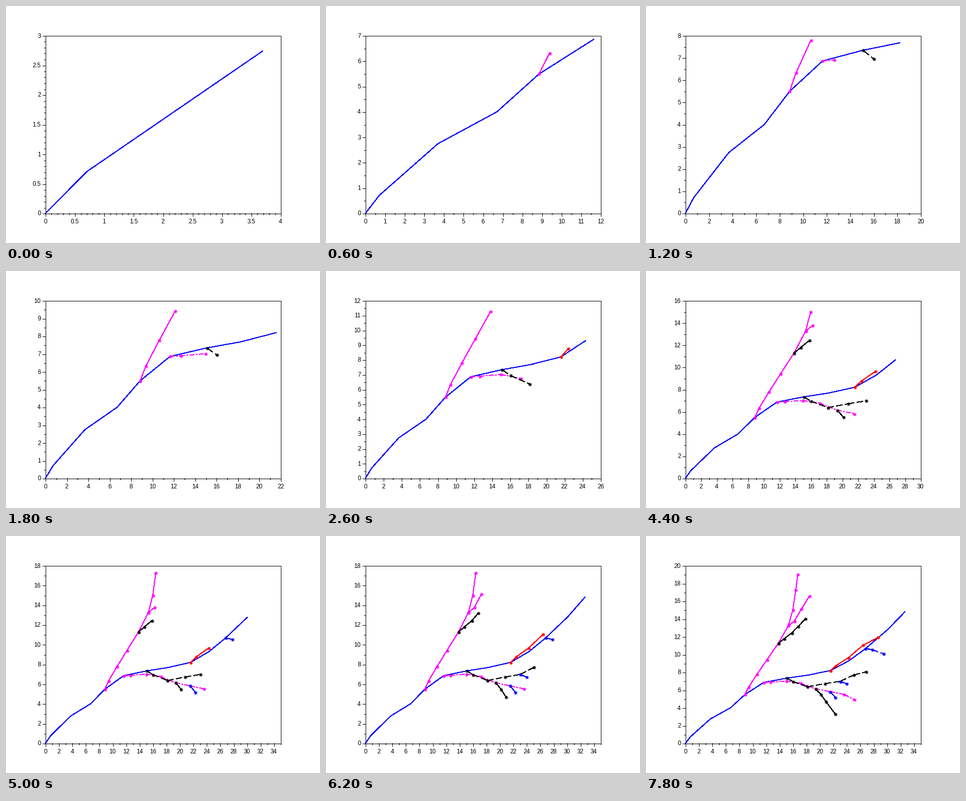
Animation of 610x460 px, one loop 8 s. Source, as a matplotlib script:

```python
import math

import matplotlib.pyplot as plt
import numpy as np
from matplotlib.animation import FuncAnimation

W, H, DPI = 610, 460, 80
STEPS, STEP_MS = 40, 200
LEFT, RIGHT, TOP, BOTTOM = 76, 533, 57, 402
PX = 72 / DPI  # one pixel in points

BLUE, MAGENTA, BLACK, RED = "#0000ff", "#ff00ff", "#000000", "#ff0000"
SOLID, DASH, DASHDOT = (), (11, 5), (8, 3, 2, 3)


class Branch:
    """A polyline that may sprout from vertex `at` of its parent."""

    def __init__(self, color, style, points, parent=None, at=0):
        self.color, self.style = color, style
        self.parent, self.at = parent, at
        base = [parent.points[at]] if parent else []
        self.points = base + points


trunk = Branch(BLUE, SOLID, [
    (0, 0), (0.707, 0.707), (3.695, 2.74), (6.71, 4.0), (8.86, 5.49),
    (11.66, 6.86), (15.1, 7.34), (18.25, 7.68), (21.6, 8.2),
    (24.35, 9.3), (26.82, 10.68), (30.06, 12.78), (32.7, 14.83)])
rise = Branch(MAGENTA, SOLID, [
    (9.4, 6.32), (10.66, 7.78), (12.14, 9.41), (13.84, 11.27),
    (15.33, 13.25), (15.98, 15.0), (16.42, 17.25), (16.73, 19.0)], trunk, 4)
fall = Branch(MAGENTA, DASHDOT, [
    (12.65, 6.9), (14.98, 7.01), (17.16, 6.76), (19.37, 6.14),
    (21.55, 5.82), (23.62, 5.52), (25.15, 4.9)], trunk, 5)
wave = Branch(BLACK, DASH, [
    (16.02, 6.95), (18.17, 6.37), (20.77, 6.72), (23.03, 6.98),
    (25.08, 7.7), (26.9, 8.04)], trunk, 6)
upper = Branch(RED, SOLID, [
    (22.44, 8.76), (24.24, 9.63), (26.45, 11.05), (28.67, 11.92)], trunk, 8)
ridge = Branch(BLACK, SOLID, [
    (14.7, 11.78), (15.84, 12.43), (16.8, 13.18), (17.86, 14.02)], rise, 4)
fork = Branch(MAGENTA, SOLID, [
    (16.22, 13.76), (17.26, 15.12), (18.47, 16.58)], rise, 5)
drop = Branch(BLACK, SOLID, [
    (20.17, 5.5), (20.93, 4.68), (22.31, 3.3)], fall, 4)
tail = Branch(BLUE, DASH, [(27.83, 10.53), (29.5, 10.07)], trunk, 10)
stub_low = Branch(BLUE, SOLID, [(22.32, 5.16)], fall, 5)
stub_mid = Branch(BLUE, DASH, [(23.99, 6.71)], wave, 4)
BRANCHES = [trunk, rise, fall, wave, upper, ridge, fork, drop,
            tail, stub_low, stub_mid]


def grow():
    """Visible vertex count per branch for every step, one tip at a time."""
    shown = {trunk: 3}
    states = [dict(shown)]
    while len(states) < STEPS:
        for tip in list(shown):
            if shown[tip] == len(tip.points):
                continue
            start = shown[tip] - 1
            shown[tip] += 1
            for child in BRANCHES:
                if child.parent is tip and child.at == start:
                    shown[child] = 2
            states.append(dict(shown))
    return states[:STEPS]


STATES = grow()


def scale(top):
    """Axis limit, label step and minor step that hold the value `top`."""
    for step in (0.5, 1, 2, 5):
        count = math.ceil(top / step - 1e-9)
        if count <= 13:
            break
    major = min(step, 2)
    return count * step, major, major / (5 if step < 1 else 2)


def ticks(limit, step):
    return np.arange(0, limit + step / 100, step)


fig = plt.figure(figsize=(W / DPI, H / DPI), dpi=DPI, facecolor="white")
ax = fig.add_axes([0, 0, 1, 1])


def stroke(x, y, color=BLACK, dashes=SOLID):
    line, = ax.plot(x, y, color=color, lw=PX, antialiased=False,
                    solid_capstyle="butt", dash_capstyle="butt")
    if dashes:
        line.set_dashes(dashes)


def label(x, y, value, align):
    ax.text(x, y, f"{value:g}", ha=align, va="center_baseline",
            family="Liberation Sans", size=11.7 * PX, color=BLACK)


def draw_axes(xlim, ylim, to_x, to_y):
    stroke([LEFT + .5, RIGHT + .5, RIGHT + .5, LEFT + .5, LEFT + .5],
           [TOP + .5, TOP + .5, BOTTOM + .5, BOTTOM + .5, TOP + .5])
    for index, size in ((1, 6), (2, 3)):
        for v in ticks(xlim[0], xlim[index]):
            x = math.floor(to_x(v)) + .5
            stroke([x, x], [BOTTOM, BOTTOM + size])
        for v in ticks(ylim[0], ylim[index]):
            y = math.floor(to_y(v)) + .5
            stroke([LEFT - size + 1, LEFT + 1], [y, y])
    for v in ticks(xlim[0], xlim[1]):
        label(to_x(v), 417.5, v, "center")
    for v in ticks(ylim[0], ylim[1]):
        label(67.5, to_y(v) - .5, v, "right")


def draw_branch(branch, count, to_x, to_y):
    pts = np.array(branch.points[:count])
    x, y = to_x(pts[:, 0]), to_y(pts[:, 1])
    if not branch.style:
        stroke(x, y, branch.color)
    else:
        # the pattern is counted along the longer axis and restarts per segment
        for i in range(count - 1):
            dx, dy = x[i + 1] - x[i], y[i + 1] - y[i]
            k = math.hypot(dx, dy) / max(abs(dx), abs(dy))
            stroke(x[i:i + 2], y[i:i + 2], branch.color,
                   [k * d for d in branch.style])
    if branch is not trunk:
        ax.plot(np.floor(x) + .5, np.floor(y) + .5, ls="none",
                marker=(8, 2, 0), ms=7 * PX, mew=PX, color=branch.color)


def update(step):
    ax.clear()
    ax.set(xlim=(0, W), ylim=(H, 0))
    ax.axis("off")
    state = STATES[step]
    seen = np.array([p for b, n in state.items() for p in b.points[:n]])
    xlim, ylim = scale(seen[:, 0].max()), scale(seen[:, 1].max())

    def to_x(v):
        return LEFT + .5 + v * (RIGHT - LEFT) / xlim[0]

    def to_y(v):
        return BOTTOM + .5 - v * (BOTTOM - TOP) / ylim[0]

    draw_axes(xlim, ylim, to_x, to_y)
    for branch, count in state.items():
        draw_branch(branch, count, to_x, to_y)
    return []


anim = FuncAnimation(fig, update, frames=STEPS, init_func=lambda: [],
                     interval=STEP_MS, repeat=True, repeat_delay=0)
plt.show()
```
